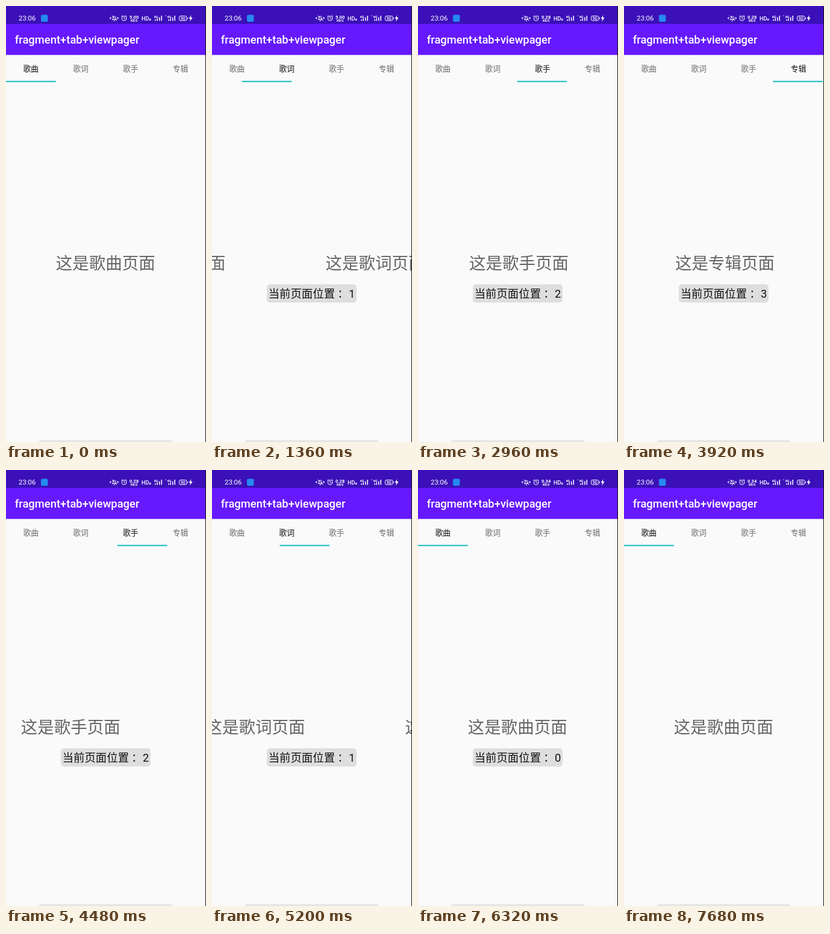
Animation of 332x719 px, one loop 7760 ms. Source, as an HTML page:

```html
<!DOCTYPE html>
<html lang="zh-CN">
<head>
<meta charset="utf-8">
<title>fragment+tab+viewpager</title>
<style>
  html, body { margin: 0; width: 100%; height: 100%; overflow: hidden; background: #fafafa; }
  svg { display: block; width: 332px; height: 719px; }
  text { font-family: Roboto, "Noto Sans CJK SC", "Noto Sans CJK", sans-serif; }
  .mid { text-anchor: middle; }
  .page { font-size: 27.5px; fill: #666; }
  .tab { font-size: 12.9px; font-weight: 500; }
  .toast { font-size: 18.4px; fill: #111; }
  .status { fill: #fff; }
  .line { fill: none; stroke: #fff; stroke-linecap: round; }
</style>
</head>
<body>
<svg viewBox="0 0 332 719">
  <rect width="332" height="719" fill="#fafafa"/>
  <g id="pages"></g>
  <path d="M55 719v-1q0-2 2-2h217q2 0 2 2v1z" fill="#e5e5e5"/>

  <rect width="332" height="30" fill="#3b10b8"/>
  <rect y="29.5" width="332" height="51.2" fill="#6519fc"/>
  <text x="14.7" y="62" font-size="18.4" font-weight="500" fill="#fff">fragment+tab+viewpager</text>

  <g class="status">
    <text x="21" y="24" font-size="11.4">23:06</text>
    <rect x="58" y="14.5" width="11.5" height="11.5" rx="2.5" fill="#2589f0"/>
    <!-- muted bell -->
    <path class="line" d="M176.5 22.5h6.5M177.5 22v-2.5a2.3 2.6 0 0 1 4.6 0v2.5M179 24.3h1.6M176 16l8 8M174 18.5v3M172.5 19.5v1M185 18.5v3M186.5 19.5v1"/>
    <!-- alarm clock -->
    <circle class="line" cx="196" cy="20.5" r="3.8"/>
    <path class="line" d="M196 18.3v2.4l1.5 .9M191.5 17.3l1.8-1.5M200.5 17.3l-1.8-1.5"/>
    <text id="speed" class="mid" x="212.7" y="20.5" font-size="7.6" font-weight="700"></text>
    <text class="mid" x="212.7" y="25.5" font-size="5" font-weight="700">KB/S</text>
    <text x="225" y="24" font-size="9" font-weight="500">HD</text>
    <circle class="line" cx="239" cy="22.4" r="1.3"/>
    <g id="signal">
      <text x="245.5" y="19.5" font-size="5.5" font-weight="700">4G</text>
      <path d="M247.5 22h1.5v2.5h-1.5zM250.5 20.5h1.5v4h-1.5zM254 18.5h1.5v6H254zM257.5 16h1.5v8.5h-1.5z"/>
    </g>
    <use href="#signal" x="22"/>
    <path d="M264 16.5h2l-1-1.5z"/>
    <!-- battery -->
    <rect class="line" x="287.5" y="16.5" width="12.5" height="7.5" rx="2.2"/>
    <rect x="300.8" y="18.8" width="1" height="3"/>
    <text class="mid" x="293.8" y="22.8" font-size="7" font-weight="500">90</text>
    <path d="M307.5 15l-4 6h2.5l-1 4.5 4.8-6.300h-2.800z"/>
  </g>

  <g id="tabs"></g>
  <rect id="bar" y="123.5" width="82.75" height="2" fill="#12bdc2"/>

  <g id="toast">
    <rect x="91" y="459" width="149" height="30" rx="5" fill="#dedede"/>
    <text class="toast" x="93.7" y="481">当前页面位置<tspan dx="4.3">：</tspan><tspan id="digit" x="227"></tspan></text>
  </g>
  <rect x="331" width="1" height="719" fill="#111"/>
</svg>
<script>
const LOOP = 7760, STEP = 80, WIDTH = 331, TAB = WIDTH / 4;
const SETTLE = 160;                       // time scale of one swipe
const BAR_LAG = 18;                       // the tab bar trails the pages
const TOAST_DELAY = 105, TAB_DELAY = 130; // from swipe start to the new selection
const TOAST_END = 7680;

const names = ['歌曲', '歌词', '歌手', '专辑'];
const swipes = [
  { start: 1189, to: 1 },
  { start: 2603, to: 2 },
  { start: 3563, to: 3 },
  { start: 4269, to: 2 },
  { start: 5020, to: 1 },
  { start: 5652, to: 0 }
];

const $ = id => document.getElementById(id);

function label(parent, text, cls, x, y) {
  const el = document.createElementNS('http://www.w3.org/2000/svg', 'text');
  el.textContent = text;
  el.setAttribute('class', cls + ' mid');
  el.setAttribute('x', x);
  el.setAttribute('y', y);
  return $(parent).appendChild(el);
}

const pages = names.map(n => label('pages', `这是${n}页面`, 'page', 0, 434));
const tabs = names.map((n, i) => label('tabs', n, 'tab', (i + .5) * TAB, 108.2));

// Slow start under the finger, then a long soft landing.
const ease = ms => 1 - Math.exp(-((ms / SETTLE) ** 2));

const position = t => swipes.reduce(
  (pos, s) => t > s.start ? pos + (s.to - pos) * ease(t - s.start) : pos, 0);

const selected = t => swipes.findLast(s => s.start <= t)?.to;

function draw(time) {
  const t = Math.floor(time % LOOP / STEP) * STEP;
  const pos = position(t);
  pages.forEach((el, i) => el.setAttribute('x', 165.3 + (i - pos) * WIDTH));
  $('bar').setAttribute('x', position(t - BAR_LAG) * TAB);

  const active = selected(t - TAB_DELAY) ?? 0;
  tabs.forEach((el, i) => el.setAttribute('fill', i === active ? '#111' : '#6c6c6c'));

  const page = selected(t - TOAST_DELAY);
  const shown = page !== undefined && t < TOAST_END;
  $('toast').setAttribute('visibility', shown ? 'visible' : 'hidden');
  $('digit').textContent = page ?? '';
  $('speed').textContent = t < 1920 ? '5.00' : t < 5360 ? '0.28' : '0.34';
}

const begin = performance.now();
function tick() {
  draw(performance.now() - begin);
  requestAnimationFrame(tick);
}
tick();
</script>
</body>
</html>
```
